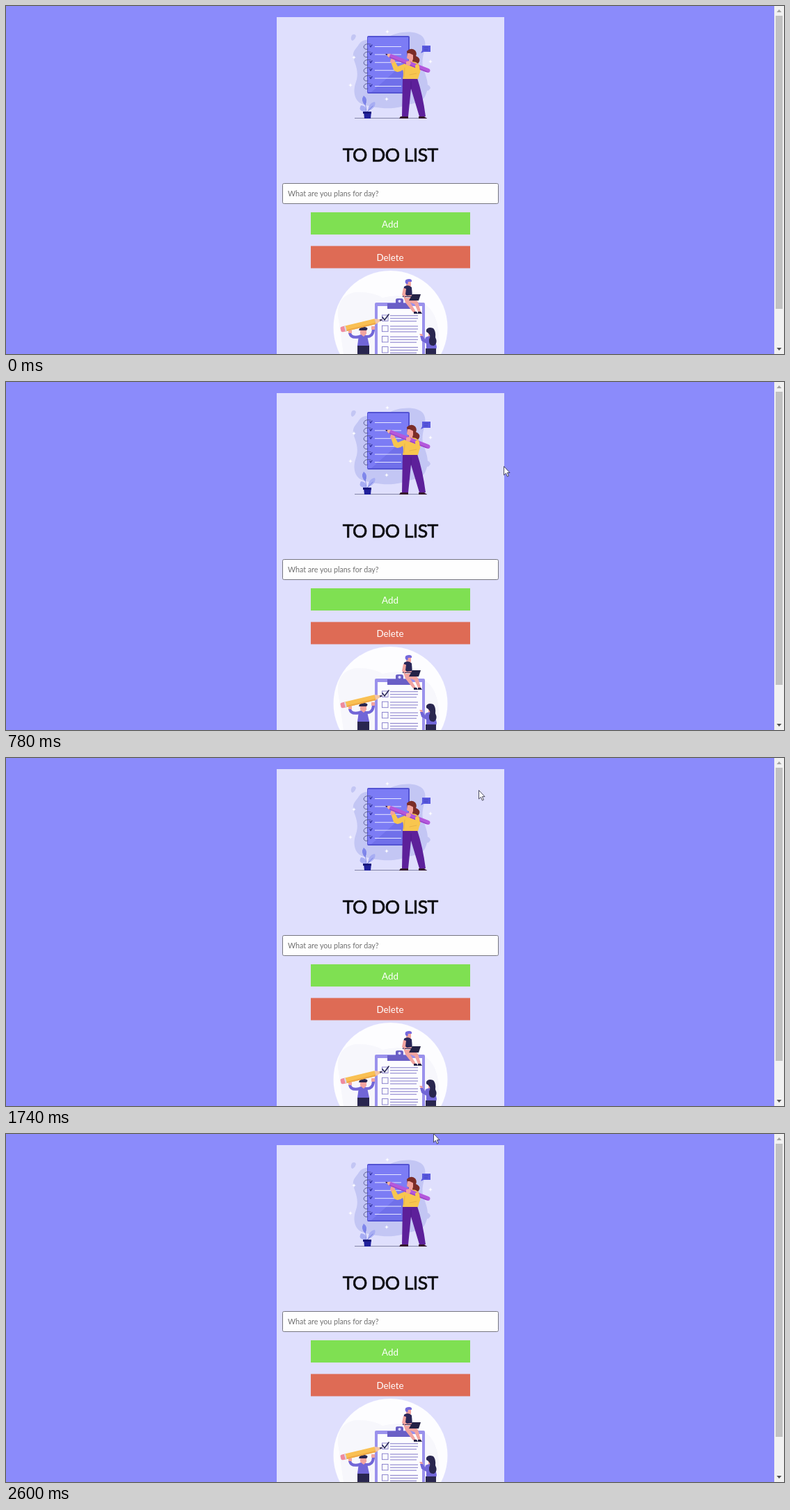
Animation, 1118 px wide and 501 px high, one loop 8000 ms. Source, as an HTML page:

```html
<!DOCTYPE html>
<html lang="en">
<head>
<meta charset="utf-8">
<title>To do list</title>
<style>
  html, body { margin: 0; width: 100%; height: 100%; overflow: hidden; background: #8b8bfb; }
  svg { display: block; width: 1118px; height: 501px; }
  text { font-family: Lato, sans-serif; }
  .button { font-size: 13.33px; fill: #fff; text-anchor: middle; }
  .line { fill: none; stroke-linecap: round; stroke-linejoin: round; }
</style>
</head>
<body>
<svg viewBox="0 0 1118 501">
  <defs>
    <clipPath id="disc"><circle cx="552.5" cy="463" r="82"/></clipPath>
  </defs>
  <rect width="1118" height="501" fill="#8b8bfb"/>
  <rect x="389" y="16" width="327" height="485" fill="#dfdffd"/>

  <!-- Notebook scene -->
  <path fill="#c3c6f4" d="M506 57C513 43 531 51 549 45C563 36 592 34 600 46C607 58 596 71 599 87C603 102 610 112 603 128C598 142 582 139 568 145C548 150 529 146 514 142C500 138 498 122 503 109C508 94 501 82 499 74C498 67 501 63 506 57Z"/>
  <path fill="#c3c6f4" d="M497 42q4-3 6 1q-1 5-5 7q-4-2-1-8M603 114q5-2 7 4q-4 7-6 2z"/>
  <rect x="519" y="43" width="61" height="83" rx="2" fill="#5353d3"/>
  <rect x="520" y="45" width="58" height="79" fill="#7c7cf5"/>
  <path fill="#7070ea" d="M578 77V124H525Z"/>
  <g id="notes"></g>
  <path stroke="#8486a8" d="M501 161.5H605"/>
  <path fill="#a7adf3" d="M517 152Q505 152 510 143Q518 143 517 152M520 152Q521 139 530 138Q533 145 520 152"/>
  <path fill="#8087eb" d="M516 143Q509 136 514 129Q521 134 516 143"/>
  <path class="line" stroke="#7179df" stroke-width=".8" d="M516 137L518 153M518 153L527 144"/>
  <path fill="#20209b" d="M514 152H525L524 162H515Z"/>
  <path fill="#17177c" d="M513 152h12v3h-12z"/>
  <path fill="#5959df" d="M598 57H610V66H600L596 68L598 64Z"/>
  <path class="line" stroke="#4545c1" d="M601 60h6M601 63h5"/>
  <path fill="#5d209a" d="M570 104H591Q599 128 603 159H594L582 119L578 159H569Z"/>
  <path class="line" stroke="#4a1786" stroke-width=".8" d="M582 109V119"/>
  <path fill="#35182b" d="M567 159h11v3h-13zM593 159h8l4 3h-12z"/>
  <path fill="#7b2d28" d="M576 65Q582 59 588 64Q591 68 589 72Q598 76 592 83Q586 87 583 80L577 74Z"/>
  <path fill="#f4a29a" d="M577 68h8v8l-2 7h-5l1-6l-3-2z"/>
  <path fill="#7b2d28" d="M576 66Q582 61 587 66L586 71L582 69Z"/>
  <path fill="#f8c64f" d="M573 83L582 80Q594 79 596 91L592 105H570Q572 96 570 92Q562 98 557 92L553 80L558 78L563 87Z"/>
  <path fill="#f4a29a" d="M552 80l2-6 4 1 1 5-5 3z"/>
  <g transform="translate(545 69) rotate(21.3)">
    <path fill="#b458dc" d="M7-3H65Q69-3 69 0T65 3H7Z"/>
    <path fill="#9b45c8" d="M7 1.5h60l-3 1.5H7z"/>
    <path fill="#f5b69e" d="M0 0L7-3V3Z"/>
    <path fill="#291a51" d="M0 0l3-1.3v2.6z"/>
  </g>
  <path fill="#f4a29a" d="M575 80l5-1 2 3-2 4-5-1z"/>
  <path class="line" stroke="#f8c64f" stroke-width="6" d="M591 87L592 95L582 98"/>
  <path class="line" stroke="#e2ad45" stroke-width=".8" d="M580 99L590 97M573 89L572 102"/>
  <g id="sparkles" fill="#fff"></g>

  <text x="483.8" y="223.5" font-size="26.67" letter-spacing="-.6" fill="#0c0c10" stroke="#0c0c10" stroke-width=".7">TO DO LIST</text>
  <rect x="397.5" y="255.5" width="310" height="29" rx="2" fill="#fefefe" stroke="#767680"/>
  <text x="405" y="274" font-size="10.7" fill="#6f6f6f">What are you plans for day?</text>
  <rect x="438" y="297" width="229" height="32" fill="#7fe052"/>
  <text class="button" x="552" y="318.5">Add</text>
  <rect x="438" y="345.5" width="229" height="32" fill="#de6b55"/>
  <text class="button" x="552" y="367">Delete</text>

  <!-- Checklist scene -->
  <g clip-path="url(#disc)">
    <rect x="470" y="381" width="165" height="120" fill="#fdfdff"/>
    <path fill="#f7f7fc" d="M477 446Q475 418 501 412Q528 411 541 420Q574 411 604 431Q626 447 622 501H485Z"/>
    <rect x="530" y="427" width="72" height="80" rx="2" fill="#9a91ec"/>
    <rect x="534" y="432" width="64" height="71" fill="#fcfcff"/>
    <path fill="#6a5fc6" d="M548 436V428H560V423Q560 421 563 421H568Q571 421 571 424V428H582V436Z"/>
    <circle cx="565.5" cy="425" r="2" fill="#ddd9ff"/>
    <g id="tasks"></g>
    <path class="line" stroke="#292858" stroke-width="1.6" d="M541 448L544 452L550 444"/>

    <path fill="#f2a4a0" d="M575 396h7v7l-3 3-4-3z"/>
    <path fill="#7569dc" d="M574 399Q572 393 579 393Q584 393 583 397L578 397L577 401Z"/>
    <path fill="#2b2859" d="M572 404Q578 400 583 405L584 419H570Z"/>
    <path fill="#f2a4a0" d="M571 406l-2 10 6 4 10-1v-3l-9 1-2-2 1-8zM571 418h13l8 8 4 14h-4l-5-11-6-2 8 13-4 1-11-14z"/>
    <path fill="#242246" d="M584 415h12l-3 9h-14zM586 440h4l2 3h-6zM592 440h4l2 3h-6z"/>

    <path class="line" stroke="#7166d7" stroke-width="4" d="M508 476Q496 479 494 471M517 476Q527 477 528 466"/>
    <path fill="#7166d7" d="M507 474Q514 471 519 475L522 489V501H505V489Z"/>
    <path fill="#f2a4a0" d="M509 466h9v6l-4 4-5-4zM492 467h5v4h-5zM525 461h5v5h-5z"/>
    <path fill="#29264f" d="M507 467Q508 461 515 462Q522 463 518 467Z"/>
    <path fill="#29264f" d="M505 489h17v12h-17z"/>
    <g transform="translate(481 466) rotate(-13.5)">
      <path fill="#f9c053" d="M6-4H51V4H6Z"/>
      <path fill="#efa945" d="M6 2h46l2 .5-3 1.5H6z"/>
      <path fill="#ef8a9e" d="M0-2Q0-4 3-4H6V4H3Q0 4 0 2Z"/>
      <path fill="#d7d5ed" d="M6-4h2V4H6z"/>
      <path fill="#f4c6a5" d="M51-4L62 0L51 4Z"/>
      <path fill="#292858" d="M58-1.5l4 1.5-4 1.5z"/>
    </g>
    <path fill="#f2a4a0" d="M607 466h6v11h-6zM594 472h4l2 5h-3z"/>
    <path fill="#7166d7" d="M603 477Q609 473 616 478L619 491L616 501H604L604 486L597 482L595 475L599 475L602 480Z"/>
    <path fill="#29264f" d="M604 466Q607 461 614 464Q618 468 617 477Q621 485 615 489Q607 490 608 480Q612 473 604 469Z"/>
    <path fill="#29264f" d="M603 493h15v8h-15z"/>
  </g>

  <!-- Scrollbar -->
  <rect x="1104" width="14" height="501" fill="#f1f1f1"/>
  <rect x="1106" y="14" width="10" height="422" fill="#c1c1c1"/>
  <path fill="#a3a3a3" d="M1107.5 9h7l-3.5-4z"/>
  <path fill="#505050" d="M1107.5 492h7l-3.5 4z"/>

  <path id="cursor" fill="#fff" stroke="#26263a" stroke-width=".8" d="M.5.5V13L3.4 10.3L5.4 15.1L7.4 14.2L5.4 9.6H9Z"/>
</svg>
<script>
  const LOOP = 8000;
  // Pointer steps: time, x, y
  const POINTER = [
    [500, 678, 340], [520, 679, 329], [640, 684, 283], [760, 710, 147], [780, 715, 121],
    [920, 726, 101], [1080, 732, 86], [1480, 727, 82], [1500, 723, 77], [1620, 703, 62],
    [1740, 679, 46], [1860, 653, 33], [1980, 629, 22], [2020, 623, 19], [2060, 615, 13],
    [2180, 632, 17], [2300, 624, 8], [2340, 619, 2], [2600, 614, -1]
  ];
  const byId = id => document.getElementById(id);
  const repeat = (count, draw) => Array.from({ length: count }, (_, i) => draw(i)).join("");

  byId("notes").innerHTML = repeat(6, i => {
    const y = 58 + i * 11.4;
    return `<path class="line" stroke="#55568c" stroke-width=".9" d="M524 ${y - 3}C511 ${y - 6} 512 ${y + 7} 520 ${y + 4}"/>
      <path class="line" stroke="#3434a4" stroke-width="1.3" d="M523 ${y - 1}l1 2 2-3"/>
      <path stroke="#e6e7ff" d="M530 ${y + .5}H568"/>`;
  });

  byId("sparkles").innerHTML = [[500, 74], [495, 114], [547, 134], [610, 80], [548, 37]]
    .map(([x, y]) => `<path d="M${x} ${y - 3}l.8 2.2 2.2.8-2.2.8-.8 2.2-.8-2.2-2.2-.8 2.2-.8z"/>`).join("");

  byId("tasks").innerHTML = repeat(4, i => {
    const y = 445 + i * 15.2;
    return `<rect x="540.5" y="${y}" width="8.5" height="8.5" fill="none" stroke="#8178c8" stroke-width=".9"/>
      <path stroke="#8178c8" d="M552 ${y + .8}H592M552 ${y + 4.8}H592M552 ${y + 8.8}H590"/>`;
  });

  const cursor = byId("cursor");
  function render(time) {
    const step = POINTER.findLast(([start]) => time >= start);
    cursor.setAttribute("visibility", step ? "visible" : "hidden");
    if (step) cursor.setAttribute("transform", `translate(${step[1]} ${step[2]})`);
  }

  const began = performance.now();
  function tick() {
    render((performance.now() - began) % LOOP);
    requestAnimationFrame(tick);
  }
  tick();
</script>
</body>
</html>
```
